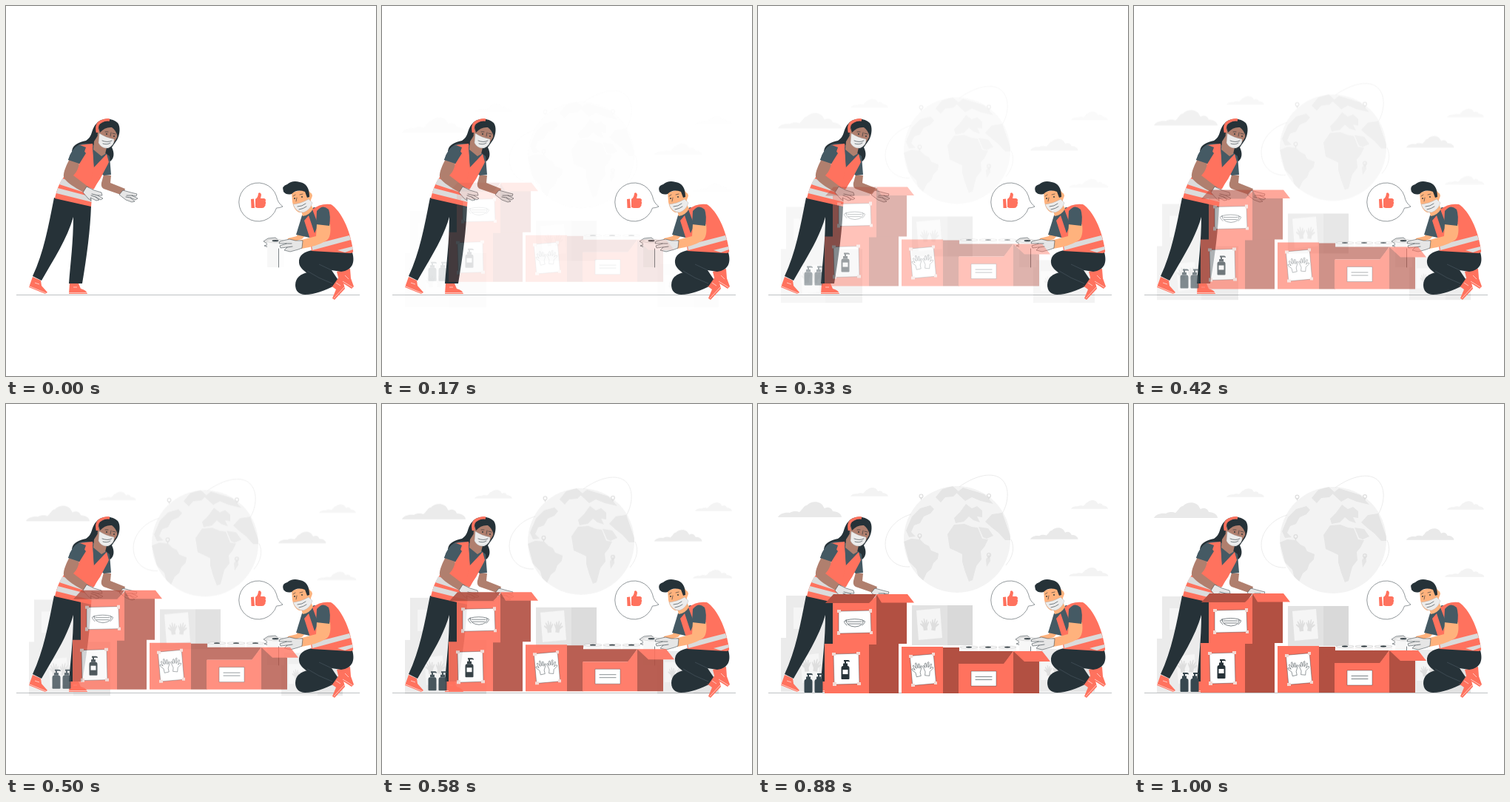
These frames come from a looping animation (500x500 px, 1.04 s). An HTML page:

```html
<!DOCTYPE html>
<html lang="en">
<head>
<meta charset="utf-8">
<title>Volunteers packing boxes</title>
<style>
  html, body { margin: 0; width: 100%; height: 100%; overflow: hidden; background: #fff; }
  svg { display: block; width: 100%; height: 100%; }
  .red { fill: #ff725e; }
  .shade { fill: #b25042; }
  .ink { fill: #263238; }
  .slate { fill: #455a64; }
  .tan { fill: #b07f6e; }
  .peach { fill: #ffb27d; }
  .glove { fill: #e6e6e6; stroke: #263238; stroke-width: .5; stroke-linejoin: round; }
  .band { fill: #dbdbdb; }
  .mask { fill: #ececec; stroke: #aaa; stroke-width: .4; }
  .line { fill: none; stroke: #263238; stroke-width: .6; stroke-linecap: round; stroke-linejoin: round; }
  .pale { fill: none; stroke: #e2e2e2; stroke-width: .7; }
  .paper { fill: #fff; stroke: #263238; stroke-width: .4; }
</style>
</head>
<body>
<svg viewBox="0 0 500 500">
  <defs>
    <path id="cloud" d="M0 21C2 16 10 14 16 15C21 12 26 13 29 14C33 11 35 5 39 5C43 0 52-1 57 2C61 4 61 7 63 9C68 6 73 9 74 13C81 13 86 17 86 21Z"/>
    <path id="hand" d="M-4 12L-4 5L-9-1Q-10-4-7-3L-4 0L-6-8Q-5-10-4-8L-1-2L-1-11Q0-13 1-11L2-2L4-9Q6-10 6-8L5-1L8-5Q9-5 9-3L4 6L4 12Z"/>
    <g id="hands">
      <use href="#hand" transform="translate(-7 0) rotate(-8) scale(.85)"/>
      <use href="#hand" transform="translate(9 0) rotate(10) scale(-.85 .85)"/>
    </g>
    <g id="bottle">
      <path d="M-5.5 8Q-5.5 5-3 5H3Q5.500 5 5.500 8V22Q5.500 23 4.500 23H-4.500Q-5.500 23-5.500 22Z"/>
      <path d="M-3 1.500H3V5H-3ZM-1-2H1V2H-1ZM-2-3H4Q6-3 6-.5L4-1H-2Z"/>
    </g>
    <g id="pin">
      <circle r="2.4" fill="none" stroke="#ddd" stroke-width="1.2"/>
      <path d="M-1.600 2L0 5.500L1.600 2Z" fill="#ddd"/>
    </g>
    <g id="roll">
      <path d="M-12 0V7H12V0Z" fill="#f7f7f7"/>
      <ellipse rx="12" ry="1.5" fill="#fff" stroke="#aaa" stroke-width=".4"/>
      <ellipse rx="4" ry=".9" class="ink"/>
    </g>
    <clipPath id="disc"><circle cx="269" cy="184" r="72"/></clipPath>
  </defs>

  <g id="back">
    <g fill="#e9e9e9">
      <use href="#cloud" transform="translate(27 133)"/>
      <use href="#cloud" transform="translate(368 168) scale(.75)"/>
      <g fill="#f3f3f3">
        <use href="#cloud" transform="translate(125 114) scale(.59 .56)"/>
        <use href="#cloud" transform="translate(423 131) scale(.58 .56)"/>
        <use href="#cloud" transform="translate(420 222) scale(.62 .56)"/>
      </g>
    </g>
    <circle cx="269" cy="184" r="72" fill="#f3f3f3"/>
    <g clip-path="url(#disc)" fill="#e5e5e5">
      <path d="M197 187L207 183L219 184L225 190L231 193L234 199L244 203L243 210L237 216L234 224L228 229L223 240L217 236L214 224L204 214Z"/>
      <path d="M200 172L208 153L219 142L233 138L238 143L233 149L224 153L219 162L211 165L207 174L213 180L204 181Z"/>
      <path d="M240 127L249 116L263 112L271 119L264 126L253 127L247 134Z"/>
      <path d="M268 121L277 114L306 123L318 136L301 132L289 127L280 132Z"/>
      <path d="M265 155L273 147L281 136L289 142L296 139L303 145L303 154L296 153L300 161L291 158L285 153L278 160L267 162Z"/>
      <path d="M256 177L265 164L279 163L289 167L297 168L303 183L311 184L306 194L301 200L302 211L295 220L290 239L285 241L280 228L276 214L276 204L268 200L259 196Z"/>
      <path d="M298 167L311 169L318 179L309 183L304 181ZM316 150L330 148L343 185L334 185L325 175L316 168L307 160ZM308 211L313 203L314 213L309 221Z"/>
    </g>
    <path class="pale" d="M272 113C290 100 313 92 327 101C341 111 339 134 330 149M207 150C183 157 168 178 173 198C177 214 190 222 205 221M342 184C347 195 345 207 335 219"/>
    <use href="#pin" x="220.5" y="125.5"/>
    <use href="#pin" x="312" y="125"/>
    <use href="#pin" x="218.5" y="179"/>
    <use href="#pin" x="312" y="205"/>

    <path fill="#ebebeb" d="M38 260H100V317H38ZM31 317H91V390H31ZM372 332H421V390H372Z"/>
    <path fill="#e2e2e2" d="M91 317H141V390H91ZM421 332H455V390H421ZM208 273H256V327H208Z"/>
    <path fill="#d9d9d9" d="M256 273H290V327H256Z"/>
    <path fill="#f5f5f5" d="M48 276H80V305H48ZM57 341L82 338L83 375L60 378ZM214 280L246 277L249 317L217 320ZM382 347H411V374H382Z"/>
    <g fill="#dedede">
      <use href="#hands" transform="translate(71 354) scale(.85)"/>
      <use href="#hands" transform="translate(231 299) scale(.8)"/>
      <use href="#hands" transform="translate(397 361) scale(.7)"/>
    </g>
  </g>

  <path d="M14 390.500H478" stroke="#263238" stroke-width=".3"/>

  <g id="woman">
    <path class="ink" d="M123 158C129 151 144 151 151 158C155 163 154 174 150 181L143 191C147 199 146 206 141 210L128 197L104 212C96 214 91 208 96 199L89 196C90 187 99 184 108 182C118 176 114 167 123 158Z"/>
    <path class="tan" d="M132 228L142 229L141 239L161 247L158 256L132 247Q128 245 129 239Z"/>
    <path class="glove" d="M153 255L158 249L169 252L177 254L176 257L170 256L178 260L175 262L168 259L174 264L170 265L162 262Z"/>
    <path class="line" d="M163 256L170 256M162 258L168 259"/>
    <path class="slate" d="M99 187Q112 183 125 191L140 203L142 228L132 229L117 217L98 213L84 208Q88 193 99 187Z"/>
    <path class="ink" d="M65 259L115 270C114 302 109 340 103 375H85C87 349 91 318 91 285C83 314 64 343 48 371L36 365C51 333 57 299 65 259Z"/>
    <path class="red" d="M99 188L117 186L119 216L136 202L138 213L127 234L117 248L115 271L66 260C71 238 79 225 98 215L108 199Z"/>
    <path class="slate" d="M117 190L137 203L119 220Z"/>
    <path class="red" d="M136 200L139 211L119 247L112 250L118 219Z"/>
    <path class="band" d="M76 233L117 247L115 255L72 241ZM70 246L116 258V265L68 253Z"/>
    <path class="tan" d="M86 207L99 212C98 221 94 226 91 229L112 245L107 253C96 247 80 238 78 231C77 225 82 214 86 207Z"/>
    <path class="slate" d="M100 188Q90 192 84 208L99 213Q105 202 108 191Z"/>
    <path class="glove" d="M104 252L109 244L119 249L129 252L130 256L124 256L131 260L128 262L121 258L126 262L122 263L114 259L115 263L111 260Z"/>
    <path class="line" d="M116 254L124 256M115 256L121 258"/>
    <path class="tan" d="M119 183L126 172L137 187L134 200L129 203L118 194Z"/>
    <path class="tan" d="M126 163Q136 157 149 164Q154 172 148 181Q142 191 135 191Q125 188 124 178Q123 169 126 163Z"/>
    <path class="ink" d="M125 164Q136 151 150 159Q154 165 151 177Q149 168 143 164Q134 163 127 171Z"/>
    <path fill="none" stroke="#ff725e" stroke-width="3.5" d="M123.500 171Q121 159 129 156Q134 153 140 154"/>
    <path class="mask" d="M126 172Q135 178 146 180Q147 188 138 192Q129 193 125 185Z"/>
    <path class="line" d="M130 182Q137 185 143 182M131 186Q137 188 141 185M134 170L138 170M144 172L148 173M142 171L141 176"/>
    <circle class="ink" cx="136" cy="173" r=".9"/>
    <circle class="ink" cx="146" cy="176" r=".9"/>
    <path class="red" d="M36 366L47 371L48 378L56 387L53 389L31 380Z"/>
    <path class="red" d="M86 375H98L101 382Q109 384 110 389H85Z"/>
    <path stroke="#fff" stroke-width=".6" fill="none" d="M31 378.500L54 388M85 387.500H110M39 374L45 376M91 380H96"/>
  </g>

  <g id="man">
    <path class="glove" d="M348 318L354 314L364 313L370 318L365 328L357 327L349 324L354 322Z"/>
    <path class="peach" d="M396 299L407 307L400 315L379 321L381 314L393 311Z"/>
    <path fill="#f7f7f7" d="M353 318H368V353H353Z"/>
    <path fill="#fdfdfd" d="M368 318H376V353H368Z"/>
    <ellipse cx="364" cy="317.5" rx="11.5" ry="2.3" fill="#f5f5f5" stroke="#aaa" stroke-width=".4"/>
    <ellipse class="ink" cx="364" cy="317.3" rx="4.5" ry="1"/>
    <path class="line" d="M368.500 328V353"/>
    <path class="red" d="M447 359L465 355L466 368L470 379L467 382L450 371Z"/>
    <path class="ink" d="M391 377C391 367 399 361 409 360L443 367L444 378C431 384 418 390 404 390C396 390 391 385 391 377Z"/>
    <path class="red" d="M439 373L451 367L456 374L458 382L444 397L441 395L446 383L439 378Z"/>
    <path stroke="#fff" stroke-width=".6" fill="none" d="M457 380L443 395M468 380L455 372M446 374L452 378M458 364L463 369"/>
    <path class="ink" d="M416 330L468 333C472 347 468 357 453 359L440 357L448 369L441 379C424 370 397 360 396 347C395 337 403 331 416 330Z"/>
    <path d="M407 358Q422 368 441 375M440 357L423 349" fill="none" stroke="#53616a" stroke-width=".5"/>
    <path class="slate" d="M400 283L416 272L432 274L438 298L410 313L392 309Z"/>
    <path class="red" d="M414 275Q425 266 439 268C453 277 465 302 469 330Q470 334 465 334L413 331L410 312L403 290L409 283L417 307L422 296Z"/>
    <path class="band" d="M413 323L464 310L466 316L414 330ZM448 330L468 325L469 329L458 333Z"/>
    <path class="peach" d="M420 294L438 295Q440 312 433 317Q420 325 399 328L396 317L419 311Z"/>
    <path class="slate" d="M420 277Q428 267 436 275Q439 283 437 297L419 295Z"/>
    <path class="glove" d="M401 317L391 317L383 315L370 318L369 321L379 321L370 324L371 327L380 326L376 330L384 332L395 329L400 327Z"/>
    <path class="line" d="M379 321L386 321M380 326L387 325"/>
    <path class="peach" d="M399 277L411 266L415 274Q410 283 401 284Z"/>
    <path class="peach" d="M386 252L407 247L411 252Q416 254 412 262L411 269Q404 279 396 279Q389 276 387 265Z"/>
    <path class="ink" d="M375 251Q372 243 380 241Q387 235 397 238Q410 240 410 258L407 259L404 251Q393 247 386 254Q379 256 375 251Z"/>
    <path class="mask" d="M388 268Q399 267 409 261L414 266Q411 276 402 279Q392 279 388 268Z"/>
    <path class="line" d="M394 271Q400 271 405 267M396 275Q402 274 406 271M388 257L391 255M397 255L401 254M393 259L392 264"/>
    <circle class="ink" cx="390" cy="260" r=".9"/>
    <circle class="ink" cx="400" cy="258" r=".9"/>
  </g>

  <g id="bubble">
    <path fill="#fff" stroke="#263238" stroke-width=".5" d="M365.500 273A26 26 0 1 1 365.500 257Q367 266 374 271Q370 273 365.500 273Z"/>
    <path class="red" d="M331 261L335 260.500L336 273L331.500 273ZM337 261Q341 258 341 253Q344 251 345 255L344 260H349Q352 261 350.500 264Q352 266 350.500 268Q351 270 349.500 271Q349 273 346 273H340L337 272Z"/>
  </g>

  <g id="front">
    <g fill="#37474f">
      <use href="#bottle" x="68" y="366"/>
      <use href="#bottle" x="82" y="366"/>
    </g>

    <path class="red" d="M90 323H150V390H90Z"/>
    <path class="shade" d="M150 322H190V390H150Z"/>
    <path class="red" d="M101 267H160V324H101Z"/>
    <path class="shade" d="M160 257H201V323H160ZM91 268L102 256H160L152 268Z"/>
    <path class="red" d="M160 256H202L211 267.500H167ZM160 258V268H150Z"/>
    <path class="paper" d="M109 279L152 278L153 308L109 309Z"/>
    <path class="line" d="M119 291Q131 288 142 291Q143 299 131 300Q119 299 119 291ZM119 292Q113 291 120 298M142 292Q148 291 141 298M121 293H140M122 296H139"/>
    <path class="paper" d="M102 337L136 336L137 377L103 378Z"/>
    <use href="#bottle" class="ink" transform="translate(118 348)"/>
    <path fill="#fff" d="M114.500 358H121.500V364H114.500Z"/>

    <path class="red" d="M194 327H250V390H194Z"/>
    <path class="shade" d="M250 328H272V390H250Z"/>
    <g transform="rotate(-5 223 358)">
      <path class="paper" d="M207 338H239V378H207Z"/>
      <use href="#hands" class="line" transform="translate(221.5 357) scale(.9)"/>
    </g>

    <use href="#roll" x="285" y="327.5"/>
    <use href="#roll" x="311" y="327.5"/>
    <use href="#roll" x="337" y="327.5"/>
    <path class="shade" d="M250 333H345L333 350H271ZM345 333L380 347V390H345Z"/>
    <path class="red" d="M271 350H332L345 333V390H271ZM345 333H384L395 347H360Z"/>
    <path class="paper" d="M288 360H322V380H288Z"/>
    <path class="line" d="M294 367.500H316M294 371.500H316"/>
    <path fill="#f3d8d2" d="M107 277H112V281H107ZM150 276H154V281H150ZM107 306H111V311H107ZM151 306H155V310H151ZM100 335H105V339H100ZM133 334H138V338H133ZM101 375H106V380H101ZM134 375H139V379H134ZM204 338H209V342H204ZM235 335H239V339H235ZM207 377H212V381H207ZM238 374H242V378H238Z"/>
  </g>
</svg>
<script>
  const LOOP = 1040, RISE = 1000, LEAD = 20, SHIFT = 20;
  const back = document.getElementById('back');
  const front = document.getElementById('front');

  const bezier = (a, b, u) => 3 * (1 - u) ** 2 * u * a + 3 * (1 - u) * u * u * b + u ** 3;

  // cubic-bezier(.36, -.01, .5, 1.38), solved by bisection
  function ease(x) {
    let low = 0, high = 1;
    for (let i = 0; i < 24; i++) {
      const mid = (low + high) / 2;
      if (bezier(.36, .5, mid) < x) low = mid; else high = mid;
    }
    return bezier(-.01, 1.38, low);
  }

  function place(group, shift, opacity) {
    group.setAttribute('transform', `translate(0 ${shift})`);
    group.style.opacity = Math.min(1, Math.max(0, opacity));
  }

  const start = performance.now();
  function draw() {
    const time = (performance.now() - start) % LOOP;
    const p = ease(Math.min(1, (time + LEAD) / RISE));
    place(back, SHIFT * (1 - p), p);
    place(front, -SHIFT * (1 - p), p);
    requestAnimationFrame(draw);
  }
  draw();
</script>
</body>
</html>
```
